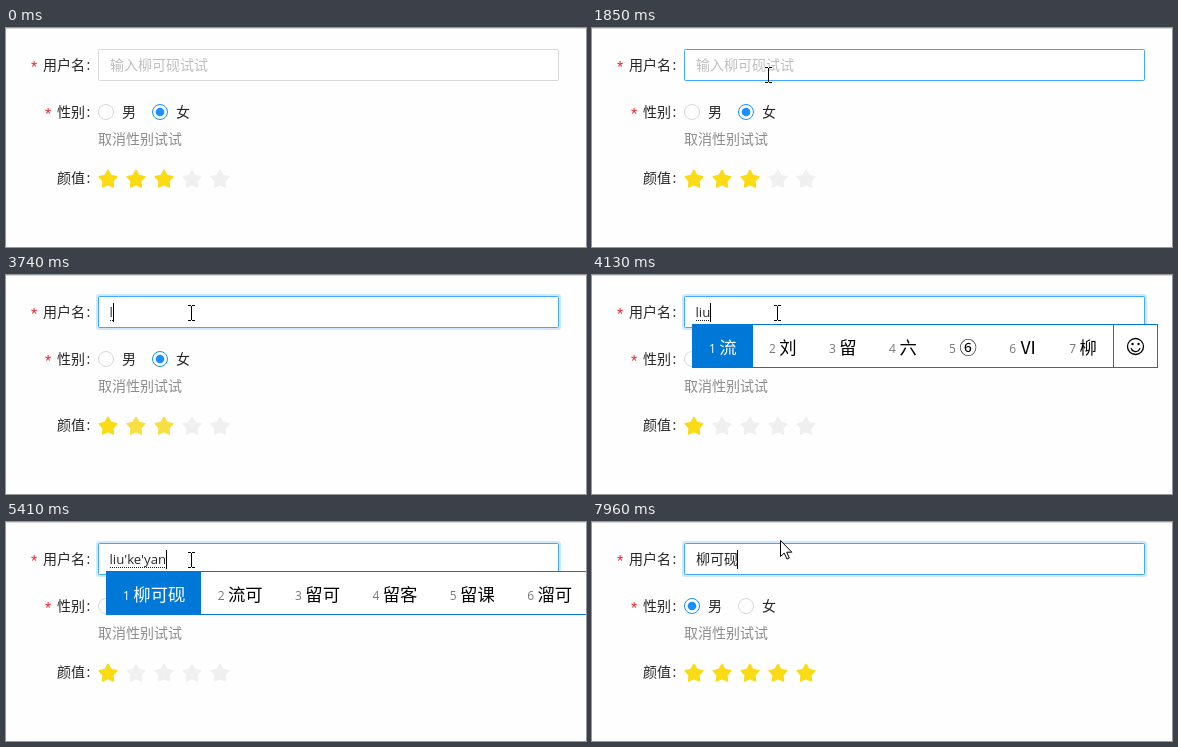
An HTML page with a canvas for the animation above (8000 ms loop, 580 px wide and 219 px high).

```html
<!DOCTYPE html>
<html lang="zh-CN">
<head>
<meta charset="utf-8">
<title>表单联动</title>
<style>
  html, body { margin: 0; width: 100%; height: 100%; overflow: hidden; background: #fff; }
  canvas { display: block; }
</style>
</head>
<body>
<canvas id="stage" width="580" height="219"></canvas>
<script>
const ctx = document.getElementById('stage').getContext('2d');
const LOOP = 8000;
const CJK = '"Noto Sans CJK SC", "Noto Sans CJK", sans-serif';
const LATIN = '"Open Sans", sans-serif';
const NAME = '柳可砚';
const GREY = [217, 217, 217], BLUE = [64, 169, 255], RADIO = [24, 144, 255];
const EMPTY = [240, 240, 240], GOLD = [250, 219, 20];

// The screen refreshes only at these moments.
const TICKS = [0, 1310, 1460, 1580, 1700, 1850, 1970, 2120, 2240, 2390, 2510, 2880, 3310,
  3740, 3860, 3980, 4130, 4560, 4710, 4830, 5290, 5410, 5840, 5990, 6110, 6230,
  6380, 6910, 7470, 7720, 7840, 7960];

// [time, shape, x, y]
const POINTER = [
  [0, null], [1310, arrow, 502, 179], [1460, arrow, 436, 153], [1580, arrow, 298, 99],
  [1700, beam, 196, 46], [1850, beam, 176, 47], [1970, beam, 177, 43], [2120, beam, 182, 40],
  [2240, beam, 185, 38], [7470, beam, 185, 42], [7720, beam, 187, 32],
  [7840, arrow, 188, 10], [7960, arrow, 188, 18]
];

const TYPED = [[0, ''], [3740, 'l'], [3980, 'li'], [4130, 'liu'], [4560, "liu'k"],
  [4710, "liu'ke"], [4830, "liu'ke'ya"], [5290, "liu'ke'yan"], [5840, '']];

const CHOICES = [
  [0, ''], [3860, '了 来 里 两 老 啦 零'], [3980, '里 力 离 利 立 例 理'],
  [4130, '流 刘 留 六 ⑥ Ⅵ 柳'], [4560, '流开 刘可 留看 六口 流口 留客 溜开'],
  [4710, '流可 留可 留客 留刻 六课 溜可 六棵'],
  [4830, NAME + ' 流可 留可 留刻 留课 溜可 六棵'],
  [5410, NAME + ' 流可 留可 留客 留课 溜可 六棵'], [5840, '']
];

const CARET = [[0, 0], [2390, 1], [2880, 0], [3310, 1], [6380, 0], [6910, 1], [7470, 0], [7960, 1]];

const at = (track, t) => track.filter(k => k[0] <= t).pop();
const ramp = (t, start, end) => Math.min(1, Math.max(0, (t - start) / (end - start)));
const mix = (a, b, p) => `rgb(${a.map((v, i) => Math.round(v + (b[i] - v) * p))})`;

function text(str, x, y, color, size = 14, family = CJK) {
  ctx.font = `${size}px ${family}`;
  ctx.fillStyle = color;
  ctx.fillText(str, x, y);
  return ctx.measureText(str).width;
}

function rect(x, y, w, h, color) {
  ctx.fillStyle = color;
  ctx.fillRect(x, y, w, h);
}

function circle(x, y, r) {
  ctx.beginPath();
  ctx.arc(x, y, r, 0, Math.PI * 2);
}

function label(str, y, required) {
  const x = 79 - str.length * 14;
  if (required) text('*', x - 12, y + 3, '#f5222d', 16, '"Liberation Sans", sans-serif');
  text(str, x, y, '#262626');
  text(':', 80.5, y, '#262626');
}

function radio(x, caption, on) {
  circle(x, 84, 7.5);
  ctx.lineWidth = 1;
  ctx.strokeStyle = mix(GREY, RADIO, on);
  ctx.stroke();
  if (on > 0) {
    circle(x, 84, 4.3 * on);
    ctx.fillStyle = mix(RADIO, RADIO, 0);
    ctx.fill();
  }
  text(caption, x + 16, 89, '#262626');
}

function star(x, y, color) {
  ctx.beginPath();
  for (let i = 0; i < 10; i++) {
    const r = i % 2 ? 5 : 9.2, a = i * Math.PI / 5 - Math.PI / 2;
    ctx.lineTo(x + r * Math.cos(a), y + r * Math.sin(a));
  }
  ctx.closePath();
  ctx.lineWidth = 1.6;
  ctx.lineJoin = 'round';
  ctx.fillStyle = ctx.strokeStyle = color;
  ctx.fill();
  ctx.stroke();
}

function stars(t) {
  const drop = ramp(t, 3680, 3980), rise = ramp(t, 5780, 6110);
  for (let i = 0; i < 5; i++) {
    const start = i < 3 ? 1 : 0;
    const level = i === 0 ? 1 : Math.max(start * (1 - drop), rise);
    star(102 + i * 28, 151.6, mix(EMPTY, GOLD, level));
  }
}

function input(t) {
  const focus = ramp(t, 2270, 2510);
  if (focus > 0) {
    ctx.beginPath();
    ctx.roundRect(90, 19, 465, 36, 3);
    ctx.fillStyle = `rgba(24,144,255,${0.2 * focus})`;
    ctx.fill();
  }
  ctx.beginPath();
  ctx.roundRect(92.5, 21.5, 460, 31, 1);
  ctx.fillStyle = '#fff';
  ctx.fill();
  ctx.lineWidth = 1;
  ctx.strokeStyle = mix(GREY, BLUE, ramp(t, 1580, 1850));
  ctx.stroke();

  const typed = at(TYPED, t)[1];
  let width = 0;
  if (typed) {
    width = text(typed, 103.5, 42, '#262626', 13.2, LATIN);
    for (let x = 104; x < 103 + width; x += 2) rect(x, 45, 1, 1, '#222');
  } else if (t >= 5840) {
    width = text(NAME, 104, 42, '#262626');
  } else {
    text(`输入${NAME}试试`, 104, 42, '#bfbfbf');
  }
  if (at(CARET, t)[1]) rect(Math.floor(104 + width), 28, 1, 19, '#000');
}

function smiley(x, y) {
  ctx.strokeStyle = '#000';
  ctx.lineWidth = 1.3;
  circle(x, y, 8);
  ctx.stroke();
  ctx.beginPath();
  ctx.arc(x, y + 0.5, 4.6, 0.25, Math.PI - 0.25);
  ctx.stroke();
  for (const dx of [-3, 3]) {
    circle(x + dx, y - 2.5, 1.2);
    ctx.fillStyle = '#000';
    ctx.fill();
  }
}

function chooser(t) {
  const line = at(CHOICES, t)[1];
  if (!line) return;
  const words = line.split(' '), size = 17.33;
  const cell = word => 42.7 + size * word.length;
  const total = words.reduce((sum, w) => sum + cell(w), 0);
  const right = Math.round(101 + total);
  rect(100, 49, right - 100 + 45, 44, '#0078d7');
  rect(101, 50, right - 101 + 44, 42, '#fff');
  rect(100, 49, Math.floor(cell(words[0])) + 1, 44, '#0078d7');
  let x = 117;
  words.forEach((word, i) => {
    text(i + 1, x, 78, i ? '#777' : '#fff', 12, LATIN);
    text(word, x + 10.3, 78.5, i ? '#000' : '#fff', size);
    x += cell(word);
  });
  rect(right, 50, 1, 42, '#0078d7');
  smiley(right + 22.5, 71.5);
}

function arrow(x, y) {
  ctx.beginPath();
  [[0, 0], [0, 16], [3.7, 12.6], [6.5, 18.5], [8.8, 17.5], [6.2, 11.7], [11.3, 11.7]]
    .forEach(([dx, dy]) => ctx.lineTo(x + 0.5 + dx, y + 0.5 + dy));
  ctx.closePath();
  ctx.lineWidth = 1;
  ctx.lineJoin = 'miter';
  ctx.fillStyle = '#fff';
  ctx.strokeStyle = '#000';
  ctx.fill();
  ctx.stroke();
}

function beam(x, y) {
  rect(x, y - 7, 1, 14, '#000');
  for (const end of [y - 8, y + 7]) {
    rect(x - 3, end, 3, 1, '#000');
    rect(x + 1, end, 3, 1, '#000');
  }
}

function draw(time) {
  const t = TICKS.filter(k => k <= time).pop();
  rect(0, 0, 580, 219, '#fefefe');
  rect(0, 0, 580, 1, '#d9d9d9');

  label('用户名', 42, true);
  label('性别', 89, true);
  label('颜值', 155, false);

  const male = ramp(t, 5780, 6110);
  radio(100, '男', male);
  radio(154, '女', 1 - male);
  text('取消性别试试', 92, 116, '#8c8c8c');
  stars(t);
  input(t);
  chooser(t);

  const [, shape, x, y] = at(POINTER, t);
  if (shape) shape(x, y);
}

function loop() {
  draw(performance.now() % LOOP);
  requestAnimationFrame(loop);
}
loop();
</script>
</body>
</html>
```
